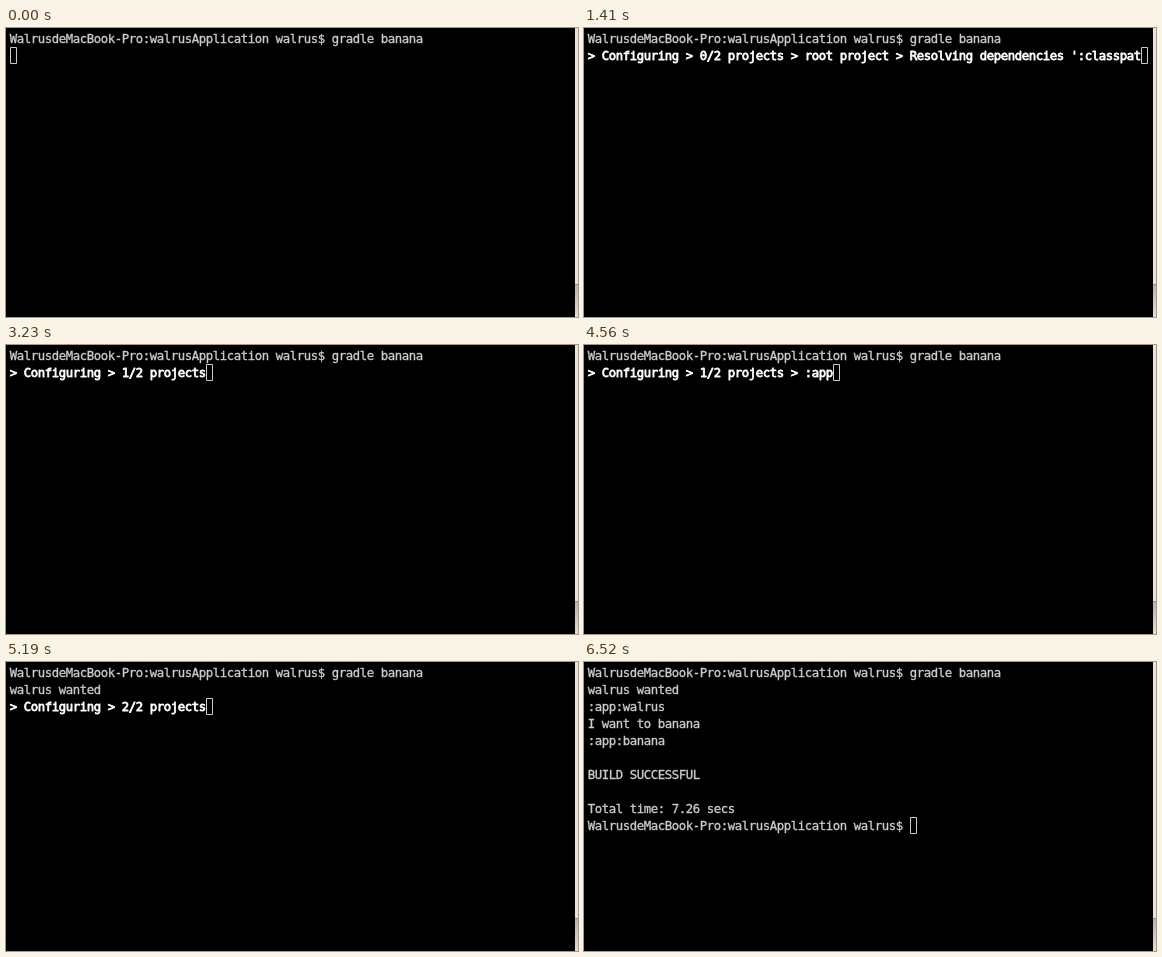
Animation of 572x289 px, one loop 8000 ms. Source, as an HTML page with a canvas:

```html
<!DOCTYPE html>
<html lang="en">
<head>
<meta charset="utf-8">
<title>Terminal build</title>
<style>
  html, body { margin: 0; width: 100%; height: 100%; overflow: hidden; background: #000; }
  canvas { display: block; }
</style>
</head>
<body>
<canvas id="stage" width="572" height="289"></canvas>
<script>
const ctx = document.getElementById('stage').getContext('2d');
const LOOP = 8000;
const LEFT = 4, TOP = 2, CELL = 7, LINE = 17, COLUMNS = 80;
const INK = '#cbcbcb';

const prompt = 'WalrusdeMacBook-Pro:walrusApplication walrus$ ';
const command = prompt + 'gradle banana';
const wanted = 'walrus wanted';
const root = '> Configuring > 0/2 projects > root project';
const app = '> Configuring > 1/2 projects > :app';
const done = '> Configuring > 2/2 projects';
const resolving = ' > Resolving dependencies ';
const report = [wanted, ':app:walrus', 'I want to banana', ':app:banana', '',
  'BUILD SUCCESSFUL', '', 'Total time: 7.26 secs'];

// The last line of each screen holds the cursor; '>' lines are bold status lines.
const screens = [
  [0, ['']],
  [500, ['> Loading']],
  [1060, ['> Configuring']],
  [1130, [root]],
  [1410, [root + resolving + "':classpath'"]],
  [2040, [root]],
  [3230, ['> Configuring > 1/2 projects']],
  [4560, [app]],
  [4980, [wanted, app]],
  [5050, [wanted, done + resolving + "':app:_debugAndroidTestCompile'"]],
  [5190, [wanted, done]],
  [5960, [...report, '']],
  [6520, [...report, prompt]]
];

const edge = ctx.createLinearGradient(0, 257, 0, 289);
edge.addColorStop(0, '#b4b4b4');
edge.addColorStop(1, '#dedede');

function drawLine(text, row) {
  const status = text.startsWith('>');
  const baseline = TOP + row * LINE + 13;
  ctx.font = '12.3px "DejaVu Sans Mono", monospace';
  ctx.textAlign = 'center';
  ctx.lineJoin = 'round';
  ctx.lineWidth = status ? 0.8 : 0.35;
  ctx.fillStyle = ctx.strokeStyle = status ? '#fff' : INK;
  [...text].forEach((char, column) => {
    const center = LEFT + (column + 0.5) * CELL;
    ctx.fillText(char, center, baseline);
    ctx.strokeText(char, center, baseline);
  });
}

function drawCursor(column, row) {
  ctx.strokeStyle = INK;
  ctx.lineWidth = 1;
  ctx.strokeRect(LEFT + column * CELL + 0.5, TOP + row * LINE + 0.5, CELL - 1, LINE - 1);
}

function drawEdge() {
  ctx.fillStyle = '#e4e4e4';
  ctx.fillRect(569, 0, 3, 256);
  ctx.fillStyle = '#8c8c8c';
  ctx.fillRect(569, 256, 3, 1);
  ctx.fillStyle = edge;
  ctx.fillRect(569, 257, 3, 32);
}

function draw(time) {
  const [, body] = screens.findLast(([start]) => start <= time);
  const lines = [command, ...body].map(line => line.slice(0, COLUMNS - 1));
  ctx.fillStyle = '#000';
  ctx.fillRect(0, 0, 572, 289);
  lines.forEach(drawLine);
  drawCursor(lines.at(-1).length, lines.length - 1);
  drawEdge();
}

const begin = performance.now();
function tick() {
  draw((performance.now() - begin) % LOOP);
  requestAnimationFrame(tick);
}
tick();
</script>
</body>
</html>
```
